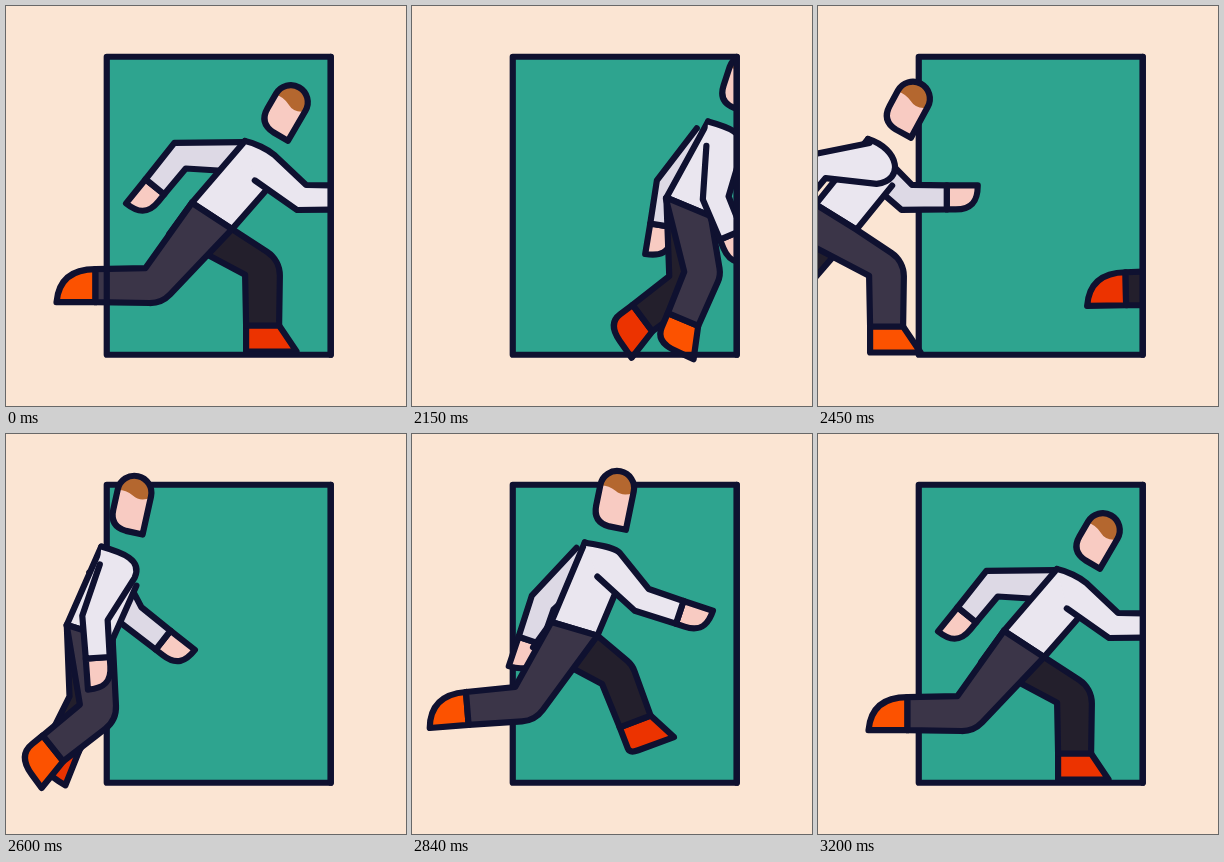
Write an HTML page with a canvas that moves like this. It is 400 px wide and 400 px high and loops after 3230 ms.

```html
<!DOCTYPE html>
<html lang="en">
<head>
<meta charset="utf-8">
<title>Runner in a doorway</title>
<style>
  html, body { margin: 0; width: 100%; height: 100%; overflow: hidden; background: #fbe5d3; }
  canvas { display: block; width: 100vw; height: 100vh; }
</style>
</head>
<body>
<canvas id="stage" width="400" height="400"></canvas>
<script>
const ctx = document.getElementById('stage').getContext('2d');
const LOOP = 3230, REST = 2000, TICK = 30, LAST = 40, WRAP = 400;
const DOOR = [100.75, 50.75, 224, 298];
const INK = '#0f1130', SKIN = '#f8cbc2';
const FRONT = { cloth: '#3b3548', shoe: '#fc5200', sleeve: '#eae6ef' };
const BACK = { cloth: '#231f2c', shoe: '#ec3300', sleeve: '#ddd9e5' };

const rad = d => d * Math.PI / 180;
const clamp = v => Math.max(0, Math.min(1, v));
const mix = (a, b, k) => a + (b - a) * k;
const lerp = (p, q, k) => [mix(p[0], q[0], k), mix(p[1], q[1], k)];
const dir = d => [Math.cos(rad(d)), Math.sin(rad(d))];
// p moved by a along u and by b along v
const go = (p, u, a, v = [0, 0], b = 0) => [p[0] + u[0] * a + v[0] * b, p[1] + u[1] * a + v[1] * b];
const turn = (x, y, d) => {
  const [c, s] = dir(d);
  return [x * c - y * s, x * s + y * c];
};

// Monotone cubic through the keys, coming to rest at the last one
function track(xs, ys) {
  const n = xs.length - 1;
  const sec = i => (ys[i + 1] - ys[i]) / (xs[i + 1] - xs[i]);
  const tan = xs.map((_, i) => {
    if (i === 0) return sec(0);
    if (i === n) return 0;
    const a = sec(i - 1), b = sec(i);
    return a * b > 0 ? 2 * a * b / (a + b) : 0;
  });
  return x => {
    let i = 0;
    while (i < n - 1 && x > xs[i + 1]) i++;
    const w = xs[i + 1] - xs[i], s = clamp((x - xs[i]) / w), r = 1 - s;
    return ys[i] * r * r * (1 + 2 * s) + ys[i + 1] * s * s * (3 - 2 * s)
      + w * (tan[i] * s * r * r - tan[i + 1] * s * s * r);
  };
}

// Key poses by step: angles in degrees, neck relative to hip
const steps = [0, 1, 9, 15, 24, 32, LAST];
const pose = {
  hipX: [206, 219, 335, 418, 528, 586, 606],
  hipY: [210, 208, 197, 211, 189, 203, 210],
  neckX: [33, 32, 10, 32, -3, 26.5, 33],
  neckY: [-75, -78, -89, -78, -91, -80, -75],
  frontArm: [40, 44, 152, 173, 62, 41, 40],
  frontFore: [0, 8, 115, 129, 42, 5, 0],
  backArm: [183, 179, 80, 45, 88, 176, 183],
  backFore: [129, 127, 60, 0, 80, 125, 129],
  frontThigh: [130, 126, 42, 45.5, 115, 127.5, 130],
  frontShin: [180, 178, 55, 90, 170, 178, 180],
  frontSize: [1, 0.95, 0.82, 1, 1, 1, 1],
  frontFlat: [0, 0, 1, 1, 0, 0, 0],
  backThigh: [45.5, 49, 125, 127, 60, 41, 45.5],
  backShin: [90, 98, 174, 179, 72, 68, 90],
  backSize: [1, 0.95, 0.95, 0.98, 0.73, 1, 1],
  backFlat: [1, 1, 0, 0, 0.5, 1, 1]
};
for (const k in pose) pose[k] = track(steps, pose[k]);

const to = p => ctx.lineTo(p[0], p[1]);
const curve = (a, b, c) => ctx.bezierCurveTo(...a, ...b, ...c);
function start(p) {
  ctx.beginPath();
  ctx.moveTo(p[0], p[1]);
}
function paint(color) {
  ctx.fillStyle = color;
  ctx.fill();
  ctx.stroke();
}

function hand(wrist, d, n, angle) {
  const side = angle < 85 ? -1 : 1;
  const a = go(wrist, n, side * 12), b = go(wrist, n, -side * 12), tip = go(a, d, 31);
  start(a);
  to(tip);
  curve(go(tip, n, -side * 15), go(b, d, 26), go(b, d, 9));
  to(b);
  ctx.closePath();
  paint(SKIN);
}

// With a neck point the sleeve flows out of the torso around the shoulder
function arm(shoulder, upper, fore, color, neck) {
  const d = dir(upper), n = dir(upper + 90), f = dir(fore), fn = dir(fore + 90);
  const elbow = go(shoulder, d, 59.5 - 3.5 * d[0]);
  const wrist = go(elbow, f, 40);
  const m = dir((upper + fore) / 2 + 90), w = 12.5 / Math.cos(rad((upper - fore) / 2));
  hand(wrist, f, fn, fore);
  if (neck) {
    const back = clamp((upper - 40) / 140);
    const top = go(shoulder, d, 8, n, -15 - 10 * back);
    start(neck);
    curve([neck[0] + mix(10, 32, back), neck[1] + mix(2, 10, back)],
      go(top, d, -8 - 22 * back), top);
  } else start(go(shoulder, n, -13));
  to(go(elbow, m, -w));
  to(go(wrist, fn, -12));
  to(go(wrist, fn, 12));
  to(go(elbow, m, w));
  to(go(shoulder, d, neck ? 10 : 0, n, 17));
  paint(color);
}

// flat: 0 for a trailing pointed foot, 1 for a planted one
function shoe(ankle, d, n, flat, color) {
  const heelTop = go(ankle, n, 16.5), instep = go(ankle, n, -16.5);
  const heel = go(ankle, d, mix(36, 26, flat), n, 16.5);
  const toe = go(ankle, d, mix(39, 26, flat), n, -mix(16.5, 34, flat));
  const round = 1 - flat;
  start(heelTop);
  to(lerp(heel, heelTop, round));
  ctx.quadraticCurveTo(...heel, ...lerp(heel, toe, round));
  to(toe);
  to(instep);
  ctx.closePath();
  paint(color);
}

function leg(hip, belt, thigh, shin, size, flat, look) {
  const d = dir(thigh), s = dir(shin), sn = dir(shin + 90);
  const knee = go(hip, d, (82 - 14 * d[0]) * size);
  const ankle = go(knee, s, 58 * size);
  const m = dir((thigh + shin) / 2 + 90), w = 17.5 / Math.cos(rad((shin - thigh) / 2));
  const instep = go(ankle, sn, -16.5);
  shoe(ankle, s, sn, flat, look.shoe);
  start(belt[0]);
  to(belt[1]);
  ctx.arcTo(...go(knee, m, -w), ...instep, 28 * size);
  to(instep);
  to(go(ankle, sn, 16.5));
  to(go(knee, m, w));
  // the seat stretches out as the thigh lifts
  to(go(belt[0], dir(126), 113 * size * Math.max(0, d[0]) ** 3));
  ctx.closePath();
  paint(look.cloth);
}

function head(neck, lean) {
  const len = 41 - lean * 0.26;
  ctx.save();
  ctx.translate(...go(neck, dir(lean - 24), 43));
  ctx.rotate(rad(lean * 1.1 + 4));
  start([0, 0]);
  to([0, -len]);
  ctx.arc(-17, -len, 17, 0, Math.PI, true);
  to([-34, -18]);
  ctx.quadraticCurveTo(-34, -1, -17, 0);
  ctx.closePath();
  paint(SKIN);
  start([-34, 1 - len]);
  ctx.quadraticCurveTo(-26, -len - 1, -18, 3 - len);
  ctx.quadraticCurveTo(-9, 8 - len, 0, 1 - len);
  ctx.arc(-17, -len, 17, 0, Math.PI, true);
  ctx.closePath();
  paint('#b4672f');
  ctx.restore();
}
</script>
<script>
// Hair keeps no outline of its own, so it is filled beneath the head's line
head = function (neck, lean) {
  const len = 41 - lean * 0.26;
  ctx.save();
  ctx.translate(...go(neck, dir(lean - 24), 43));
  ctx.rotate(rad(lean * 1.1 + 4));
  const face = new Path2D(`M0 0V${-len}a17 17 0 0 0-34 0V-18Q-34-1-17 0Z`);
  const hair = new Path2D(`M0 ${1 - len}V${-len}a17 17 0 0 0-34 0v1q8-2 16 2q9 5 18-2Z`);
  ctx.fillStyle = SKIN;
  ctx.fill(face);
  ctx.fillStyle = '#b4672f';
  ctx.fill(hair);
  ctx.stroke(face);
  ctx.restore();
};

function runner(p, x) {
  const hip = [x, p.hipY], neck = [x + p.neckX, p.hipY + p.neckY];
  const lean = Math.atan2(p.neckX, -p.neckY) * 180 / Math.PI;
  const b = dir(lean + 9.5), belt = [go(hip, b, -24), go(hip, b, 24)];
  const at = (dx, dy) => go(neck, turn(dx, dy, lean), 1);

  head(neck, lean);
  arm(at(5.4, 17.3), p.backArm, p.backFore, BACK.sleeve);
  leg(hip, belt, p.backThigh, p.backShin, p.backSize, p.backFlat, BACK);
  start(neck);
  to(belt[0]);
  to(belt[1]);
  to(at(40, 34));
  paint(FRONT.sleeve);
  leg(hip, belt, p.frontThigh, p.frontShin, p.frontSize, p.frontFlat, FRONT);
  arm(at(20, 13), p.frontArm, p.frontFore, FRONT.sleeve, neck);
}

function clipped(draw) {
  ctx.save();
  ctx.beginPath();
  ctx.rect(0, 0, DOOR[0] + DOOR[2], 400);
  ctx.clip();
  draw();
  ctx.restore();
}

function frame(now) {
  const step = Math.max(0, Math.min(LAST, Math.floor((now % LOOP - REST) / TICK)));
  const p = {};
  for (const k in pose) p[k] = pose[k](step);
  ctx.lineWidth = 6.2;
  ctx.lineJoin = ctx.lineCap = 'round';
  ctx.strokeStyle = INK;
  ctx.fillStyle = '#fbe5d3';
  ctx.fillRect(0, 0, 400, 400);
  ctx.fillStyle = '#2ea48f';
  ctx.fillRect(...DOOR);

  // The leaving runner is behind the door frame, the entering one in front
  clipped(() => runner(p, p.hipX));
  ctx.strokeRect(...DOOR);
  clipped(() => runner(p, p.hipX - WRAP));
  start([DOOR[0] + DOOR[2], DOOR[1]]);
  to([DOOR[0] + DOOR[2], DOOR[1] + DOOR[3]]);
  ctx.stroke();
  requestAnimationFrame(frame);
}

requestAnimationFrame(frame);
</script>
</body>
</html>
```
